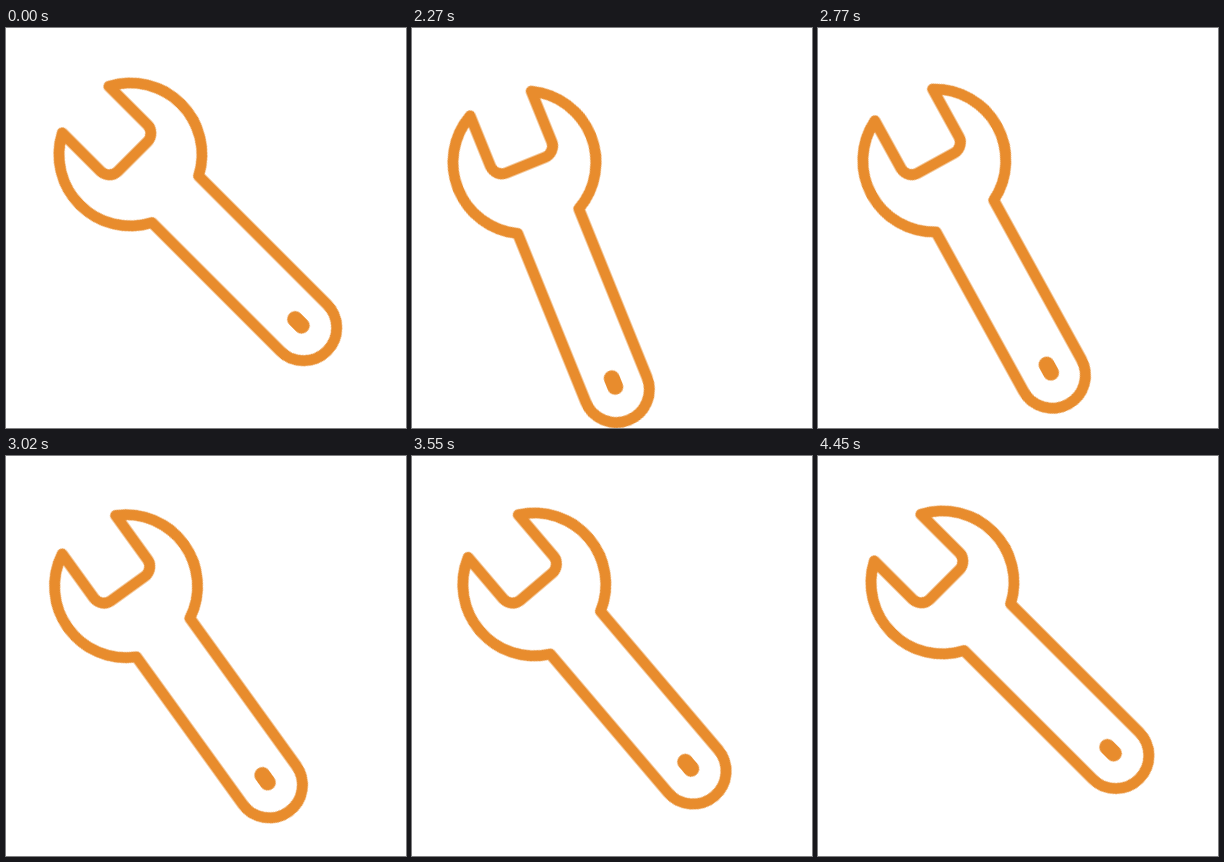
These frames come from a looping animation (400x400 px, 4470 ms). An HTML page:

```html
<!DOCTYPE html>
<html lang="en">
<head>
<meta charset="utf-8">
<title>Wrench</title>
<style>
  html, body {
    margin: 0;
    width: 100%;
    height: 100%;
    overflow: hidden;
    background: #fff;
  }
  svg {
    display: block;
    width: 100%;
    height: 100%;
  }
  .wrench {
    fill: none;
    stroke: #e88c2d;
    stroke-width: 11;
    stroke-linecap: round;
    stroke-linejoin: round;
    transform-origin: 0 0;
    animation: turn 4470ms cubic-bezier(.333, 0, .667, 1) infinite;
  }
  .hole { stroke-width: 16; }

  /* Rest, then three swings around the jaw */
  @keyframes turn {
    0%, 44.52% { transform: rotate(0deg); }
    50.89%     { transform: rotate(23deg); }
    57.27%     { transform: rotate(-10deg); }
    63.94%     { transform: rotate(23deg); }
    70.36%     { transform: rotate(0deg); }
    76.47%     { transform: rotate(-10deg); }
    82.84%     { transform: rotate(22.5deg); }
    89.26%     { transform: rotate(-10deg); }
    100%       { transform: rotate(0deg); }
  }
</style>
</head>
<body>
<svg viewBox="0 0 400 400">
  <g transform="translate(99 101) rotate(45)">
    <g class="wrench">
      <path d="M-27.4 -33 A71.5 71.5 0 0 1 99.4 -33 H281 A33 33 0 0 1 281 33 H99.4
               A71.5 71.5 0 0 1 -27.4 33 H27 A12 12 0 0 0 39 21 V-21 A12 12 0 0 0 27 -33 Z"/>
      <path class="hole" d="M269 0 H278"/>
    </g>
  </g>
</svg>
</body>
</html>
```
